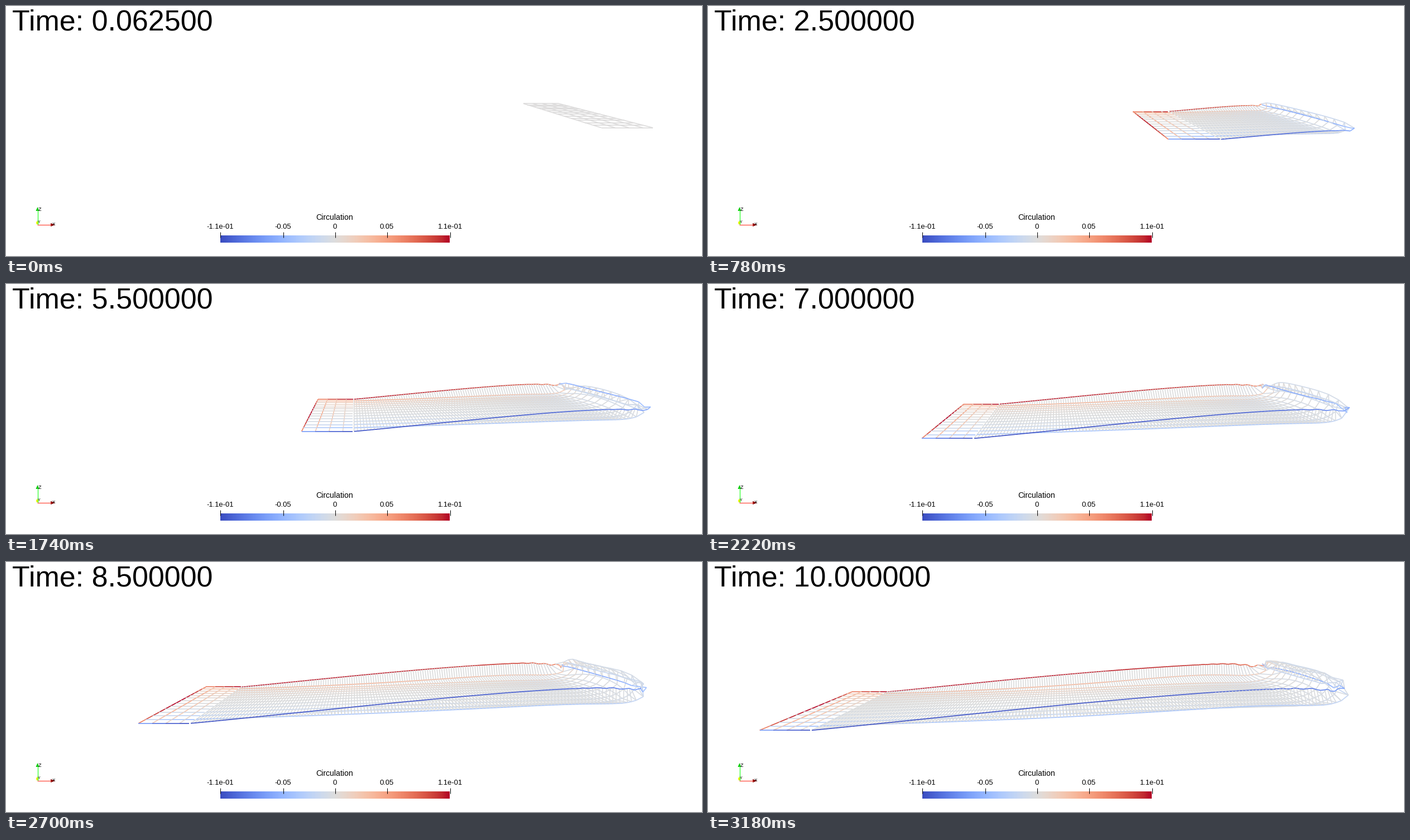
These frames come from a looping animation (1247x449 px, 3.24 s). A matplotlib script:

```python
import numpy as np
import matplotlib.pyplot as plt
from matplotlib.animation import FuncAnimation
from matplotlib.collections import LineCollection
from matplotlib.colors import Normalize

W, H, DPI = 1247, 449, 100
FRAMES, INTERVAL = 54, 60
STEPS_PER_FRAME, DT = 3, 1 / 16
CHORD_PANELS, SPAN_PANELS, SPAN = 4, 13, 4.0
ALPHA = np.radians(5)
CORE = 0.02
START_X = 4.525
LIMIT = 0.11

plt.rcParams["font.family"] = "Liberation Sans"


# --- Unsteady vortex lattice: flat wing started from rest, free wake ---

def strengths(rings):
    """Net circulation of the spanwise and chordwise filaments of a ring grid."""
    pad = np.pad(rings, 1)
    return pad[1:, 1:-1] - pad[:-1, 1:-1], pad[1:-1, :-1] - pad[1:-1, 1:]


def induced(points, nodes, rings, chunk=96):
    span, chord = strengths(rings)
    flat = nodes.reshape(-1, 3)
    flat_sq = (flat ** 2).sum(1)
    out = np.zeros_like(points)
    for i in range(0, len(points), chunk):
        p = points[i:i + chunk]
        sq = (p ** 2).sum(1)[:, None] + flat_sq - 2 * p @ flat.T
        r = np.sqrt(np.maximum(sq, 0) + CORE ** 2).reshape(len(p), *nodes.shape[:2])
        families = (
            (nodes[:, :-1], nodes[:, 1:], r[:, :, :-1], r[:, :, 1:], span),
            (nodes[:-1], nodes[1:], r[:, :-1], r[:, 1:], chord),
        )
        for a, b, ra, rb, gamma in families:
            edge = b - a
            total = ra + rb
            k = total / (ra * rb * (total * total - (edge ** 2).sum(-1)))
            k = (k * (gamma / (2 * np.pi))).reshape(len(p), -1)
            out[i:i + chunk] += (k @ np.cross(a, b).reshape(-1, 3)
                                 - np.cross(p, k @ edge.reshape(-1, 3)))
    return out


def grid(xs, ys):
    x, y = np.meshgrid(xs, ys, indexing="ij")
    return np.stack([x, y, np.zeros_like(x)], axis=-1)


def simulate():
    edges = np.linspace(-SPAN / 2, SPAN / 2, SPAN_PANELS + 1)
    ring_x = np.append(np.arange(CHORD_PANELS) / CHORD_PANELS, 0.9375 + 0.3 * DT)
    wing0 = grid(ring_x, edges)
    control0 = grid(0.125 + np.arange(CHORD_PANELS) / CHORD_PANELS,
                    (edges[1:] + edges[:-1]) / 2).reshape(-1, 3)
    shape = (CHORD_PANELS, SPAN_PANELS)
    units = np.eye(CHORD_PANELS * SPAN_PANELS)
    influence = np.stack([induced(control0, wing0, u.reshape(shape))[:, 2] for u in units], axis=1)
    half = (SPAN_PANELS + 1) // 2

    wake = np.zeros((0, SPAN_PANELS + 1, 3))
    wake_rings = np.zeros((0, SPAN_PANELS))
    snapshots = []
    for step in range(1, STEPS_PER_FRAME * (FRAMES - 1) + 2):
        t = step * DT
        shift = np.array([START_X - np.cos(ALPHA) * t, 0, -np.sin(ALPHA) * t])
        wing = wing0 + shift
        upwash = np.full(len(control0), np.sin(ALPHA))
        if len(wake):
            trail = np.concatenate([wing[-1:], wake])
            upwash += induced(control0 + shift, trail, wake_rings)[:, 2]
        bound = np.linalg.solve(influence, -upwash).reshape(shape)
        # Positive rings carry lift.
        nodes = np.concatenate([wing, wake])
        rings = np.concatenate([bound, wake_rings])
        if (step - 1) % STEPS_PER_FRAME == 0:
            snapshots.append((nodes, rings if len(wake) else rings * 0))
        if len(wake):
            v = induced(wake[:, :half].reshape(-1, 3), nodes, rings).reshape(-1, half, 3)
            mirrored = v[:, ::-1] * [1, -1, 1]
            wake = wake + DT * np.concatenate([v, mirrored], axis=1)
        wake = np.concatenate([wing[-1:], wake])
        wake_rings = np.concatenate([bound[-1:], wake_rings])
    return snapshots


# --- Camera and drawing ---

def project(p):
    """Screen x, screen y and depth, for a camera pitched slightly downwards."""
    x, y, z = np.moveaxis(p, -1, 0)
    depth = 10.53 + 0.986 * y - 0.167 * z
    up = 0.400 + 0.167 * y + 0.986 * z
    return np.stack([623.5 + 850 * x / depth, 224.7 - 850 * up / depth, depth], axis=-1)


def lattice(nodes, rings):
    """Screen segments and their circulation, sorted from far to near."""
    span, chord = strengths(rings)
    pts = project(nodes)
    span_seg = np.stack([pts[:, :-1], pts[:, 1:]], axis=2)
    chord_seg = np.stack([pts[:-1], pts[1:]], axis=2)
    # The wing stops a little short of the first wake row.
    last = CHORD_PANELS - 1
    cut = pts[last] + 0.87 * (pts[last + 1] - pts[last])
    chord_seg[last, :, 1] = cut
    if len(nodes) == CHORD_PANELS + 1:
        span_seg[-1] = np.stack([cut[:-1], cut[1:]], axis=1)
    segs = np.concatenate([span_seg.reshape(-1, 2, 3), chord_seg.reshape(-1, 2, 3)])
    values = np.concatenate([span.ravel(), chord.ravel()])
    order = np.argsort(-segs[:, :, 2].mean(axis=1), kind="stable")
    return segs[order, :, :2], values[order]


def px(size):
    return size * 72 / DPI


fig = plt.figure(figsize=(W / DPI, H / DPI), dpi=DPI, facecolor="white")
ax = fig.add_axes([0, 0, 1, 1])
ax.set_xlim(0, W)
ax.set_ylim(H, 0)
ax.axis("off")


def label(x, y, text, size, **kw):
    return ax.text(x, y, text, fontsize=px(size), color="black", va="baseline", **kw)


def stroke(xs, ys, color, width=1):
    ax.plot(xs, ys, color=color, lw=px(width), solid_capstyle="butt")


def draw_colorbar():
    left, right, top, bottom = 384, 795, 413, 425.5
    ax.imshow(np.linspace(0, 1, 256)[None], cmap="coolwarm", aspect="auto",
              extent=(left, right, bottom, top), interpolation="nearest")
    ax.set_xlim(0, W)
    ax.set_ylim(H, 0)
    label(588.5, 384.5, "Circulation", 14, ha="center")
    ticks = ((384, "-1.1e-01"), (496.5, "-0.05"), (589.5, "0"), (682.5, "0.05"), (795.5, "1.1e-01"))
    for x, text in ticks:
        stroke([x, x], [406, 416], "black")
        label(x, 400.5, text, 13, ha="center")


def draw_triad():
    stroke([56.5, 56.5], [392.5, 366], "#33ff33", 1.3)
    stroke([56, 81], [392.8, 392.8], "#ff5040", 1.3)
    ax.fill([56.5, 53.5, 59.5], [361, 368, 368], color="#00c800", lw=0)
    ax.fill([88, 80, 80], [393, 390, 396], color="#8c0000", lw=0)
    ax.fill([56.5, 54, 54.5, 58, 58.5], [386, 388, 392, 392, 388], color="#f0f000", lw=0)
    label(57.5, 368.5, "Z", 9)
    label(57, 389.5, "Y", 7)
    label(82.5, 393.5, "X", 8)


draw_colorbar()
draw_triad()
clock = label(11, 44, "", 52)
mesh = LineCollection([], cmap="coolwarm", norm=Normalize(-LIMIT, LIMIT, clip=True),
                      linewidths=px(1.7), capstyle="butt")
ax.add_collection(mesh, autolim=False)

snapshots = simulate()


def update(frame):
    segs, values = lattice(*snapshots[frame])
    mesh.set_segments(segs)
    mesh.set_array(values)
    clock.set_text(f"Time: {DT * (1 + STEPS_PER_FRAME * frame):.6f}")
    return mesh, clock


anim = FuncAnimation(fig, update, frames=FRAMES, interval=INTERVAL, repeat=True, repeat_delay=0)
plt.show()
```
